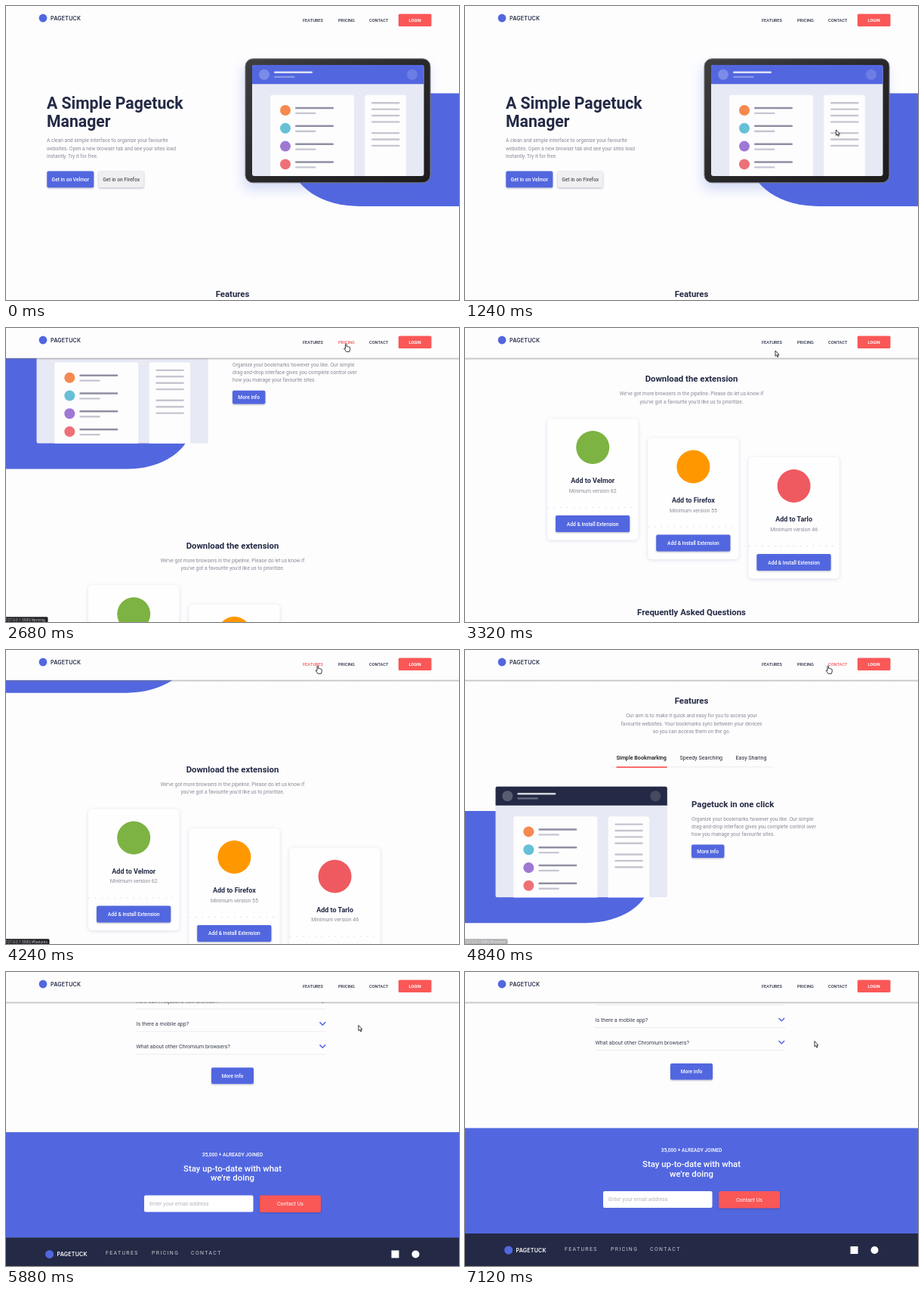
An HTML page that plays this animation: 600x389 px, repeating every 7.16 s.

```html
<!DOCTYPE html>
<html lang="en">
<head>
<meta charset="utf-8">
<title>Pagetuck</title>
<style>
  html, body { margin: 0; width: 100%; height: 100%; overflow: hidden; background: #fdfdfe; }
  svg { display: block; width: 600px; height: 389px; }
  text { font: 400 6.66px Roboto, sans-serif; fill: #8a8b97; }
  .mid { text-anchor: middle; }
  .h1 { font-size: 21.2px; font-weight: 600; fill: #242a45; }
  .h2 { font-size: 11.4px; font-weight: 600; fill: #242a45; }
  .h3 { font-size: 9px; font-weight: 600; fill: #242a45; }
  .tab { font-size: 7.15px; fill: #23252f; }
  .on { font-weight: 500; fill: #111; }
  .btn { font-weight: 500; fill: #fff; text-anchor: middle; }
  .nav { font-size: 5.65px; font-weight: 500; fill: #2b2f45; }
  .brand { font: 600 7.1px Inter, sans-serif; letter-spacing: .2px; fill: #242a45; }
  .foot { font-size: 6.9px; letter-spacing: 1.4px; fill: #c9cad3; }
  .light { fill: #fff; }
  .blue { fill: #5267df; }
  .red { fill: #fa5757; }
  .lift { filter: drop-shadow(0 1.5px 1.2px rgba(40, 45, 90, .35)); }
  .card { fill: #fefefe; filter: drop-shadow(0 1.5px 2.5px rgba(60, 70, 130, .16)); }
  .tablet { filter: drop-shadow(-3px 9px 8px rgba(82, 103, 223, .22)); }
  .rule { stroke: #e4e4ea; stroke-width: .7; }
  .chev { fill: none; stroke: #5267df; stroke-width: 1.5; }
  .dots { stroke: #cfd2e6; stroke-width: 1.3; stroke-linecap: round; stroke-dasharray: 0 8.5; }
</style>
</head>
<body>
<svg viewBox="0 0 600 389" xmlns="http://www.w3.org/2000/svg">
  <defs>
    <linearGradient id="frame" x2="1" y2="1">
      <stop offset="0" stop-color="#3f3f42"/><stop offset=".5" stop-color="#29282a"/><stop offset="1" stop-color="#1d1b1c"/>
    </linearGradient>
    <linearGradient id="fade" x2="0" y2="1">
      <stop offset="0" stop-color="#777" stop-opacity=".55"/><stop offset="1" stop-color="#777" stop-opacity="0"/>
    </linearGradient>
    <clipPath id="screen"><rect x="326" y="78" width="227.5" height="147" rx="3"/></clipPath>
    <g id="lines">
      <rect width="51" height="2.5" rx="1.2" fill="#8f8fa3"/>
      <rect y="7" width="27.5" height="2.3" rx="1.1" fill="#c6c6d2"/>
    </g>
    <!-- app window; its bar takes the current colour -->
    <g id="app" clip-path="url(#screen)">
      <rect x="326" y="78" width="228" height="147" fill="#e7e9f5"/>
      <rect x="326" y="78" width="228" height="25.3" fill="currentColor"/>
      <circle cx="342" cy="90.8" r="7" fill="#fff" opacity=".24"/>
      <circle cx="538" cy="90.8" r="7" fill="#fff" opacity=".15"/>
      <rect x="355" y="86.5" width="51" height="2.6" rx="1.3" fill="#fff" opacity=".8"/>
      <rect x="355" y="92.8" width="27.5" height="2.3" rx="1.1" fill="#fff" opacity=".32"/>
      <rect x="350" y="117.8" width="111" height="120" rx="3" fill="#fdfdfe"/>
      <rect x="475.3" y="117.8" width="54.5" height="120" rx="3" fill="#fdfdfe"/>
      <g id="rows"></g>
    </g>
  </defs>

  <g id="page">
    <!-- hero -->
    <path class="blue" d="M600 115.5H378V205A90 60 0 0 0 468 265H600Z"/>
    <g class="tablet">
      <rect x="317" y="69.8" width="245" height="164" rx="10" fill="url(#frame)" stroke="#77777b" stroke-width="1"/>
    </g>
    <use href="#app" color="#5267df"/>
    <text class="h1" x="54" y="135.6">A Simple Pagetuck</text>
    <text class="h1" x="54" y="160">Manager</text>
    <text x="54" y="180.3">A clean and simple interface to organize your favourite</text>
    <text x="54" y="190.5">websites. Open a new browser tab and see your sites load</text>
    <text x="54" y="200.7">instantly. Try it for free.</text>
    <rect class="blue lift" x="54.3" y="218.5" width="62" height="21.7" rx="2"/>
    <text class="btn" x="85.4" y="231.6">Get in on Velmor</text>
    <rect class="lift" x="122.6" y="218.5" width="60" height="21.7" rx="2" fill="#f0f0f2"/>
    <text class="btn" x="152.6" y="231.6" style="fill:#55565e">Get in on Firefox</text>

    <!-- features -->
    <text class="h2 mid" x="300" y="385.3">Features</text>
    <text class="mid" x="300" y="403.4">Our aim is to make it quick and easy for you to access your</text>
    <text class="mid" x="300" y="413.5">favourite websites. Your bookmarks sync between your devices</text>
    <text class="mid" x="300" y="423.6">so you can access them on the go.</text>
    <text class="tab on" x="200.5" y="458.6">Simple Bookmarking</text>
    <text class="tab" x="284.5" y="458.6">Speedy Searching</text>
    <text class="tab" x="358.5" y="458.6">Easy Sharing</text>
    <path class="rule" d="M192 468.8H408"/>
    <rect class="red" x="200.5" y="468.2" width="67.2" height="1.7"/>
    <path class="blue" d="M0 527H245V618A85 57 0 0 1 160 675.2H0Z"/>
    <use href="#app" color="#242a45" x="-285.7" y="416.4"/>
    <text class="h2" x="300" y="521.5">Pagetuck in one click</text>
    <text x="300" y="539.7">Organize your bookmarks however you like. Our simple</text>
    <text x="300" y="549.9">drag-and-drop interface gives you complete control over</text>
    <text x="300" y="560.1">how you manage your favourite sites.</text>
    <rect class="blue lift" x="300" y="571.5" width="43.4" height="17.6" rx="2"/>
    <text class="btn" x="321.7" y="582.6">More info</text>

    <!-- download -->
    <text class="h2 mid" x="300" y="780.3">Download the extension</text>
    <text class="mid" x="300" y="798.4">We've got more browsers in the pipeline. Please do let us know if</text>
    <text class="mid" x="300" y="808.6">you've got a favourite you'd like us to prioritize.</text>
    <g id="cards"></g>

    <!-- questions -->
    <text class="h2 mid" x="300" y="1089.4">Frequently Asked Questions</text>
    <text class="mid" x="300" y="1107.5">Here are some of our FAQs. If you have any other questions</text>
    <text class="mid" x="300" y="1117.7">you'd like answered please feel free to email us.</text>
    <g id="faq"></g>
    <rect class="blue lift" x="272" y="1271" width="56" height="21.6" rx="2"/>
    <text class="btn" x="300" y="1284.2">More info</text>

    <!-- contact -->
    <rect class="blue" y="1356.5" width="600" height="140"/>
    <text class="btn" x="300" y="1388.4">35,000 + ALREADY JOINED</text>
    <text class="h2 mid light" x="300" y="1408.4" style="font-weight:500">Stay up-to-date with what</text>
    <text class="h2 mid light" x="300" y="1421" style="font-weight:500">we're doing</text>
    <rect class="light" x="183" y="1440" width="144.5" height="22" rx="2"/>
    <text class="tab" x="190" y="1453.4" style="fill:#b4b4bf">Enter your email address</text>
    <rect class="red lift" x="336" y="1440" width="81" height="22.6" rx="2"/>
    <text class="tab mid light" x="376.5" y="1453.6">Contact Us</text>

    <!-- footer -->
    <rect y="1496" width="600" height="44" fill="#242a45"/>
    <circle class="blue" cx="57.6" cy="1518" r="5.5"/>
    <text class="brand light" x="67.5" y="1520.8">PAGETUCK</text>
    <text class="foot" x="132" y="1519">FEATURES</text>
    <text class="foot" x="193" y="1519">PRICING</text>
    <text class="foot" x="245" y="1519">CONTACT</text>
    <rect class="light" x="510.5" y="1513" width="10" height="10"/>
    <circle class="light" cx="542.5" cy="1518" r="5"/>
  </g>

  <!-- fixed bar -->
  <rect width="600" height="40" fill="#fdfdfe"/>
  <rect id="shade" y="39.7" width="600" height="2.8" fill="url(#fade)"/>
  <circle class="blue" cx="49" cy="16" r="5.4"/>
  <text class="brand" x="59" y="18.6">PAGETUCK</text>
  <text class="nav" x="393" y="21">FEATURES</text>
  <text class="nav" x="440" y="21">PRICING</text>
  <text class="nav" x="481" y="21">CONTACT</text>
  <rect class="red" x="519.8" y="10.6" width="43.7" height="16.5" rx="1.6"/>
  <text class="btn" x="541.6" y="21" style="font-size:5.6px;font-weight:700">LOGIN</text>

  <g id="status">
    <path fill="#202124" d="M0 382.3H54a1.5 1.5 0 0 1 1.5 1.5V389H0Z"/>
    <text x="-.5" y="387.8" style="font-size:4.9px;fill:#c4c5c9"></text>
  </g>
  <g id="arrow" fill="#fff" stroke="#222" stroke-width=".9" stroke-linejoin="round">
    <path d="M0 0V7.3L1.7 5.8 2.8 8.4 4 7.9 2.9 5.4H5Z"/>
  </g>
  <g id="hand" fill="#fff" stroke="#222" stroke-width=".9" stroke-linejoin="round">
    <path d="M0 1Q.8-.6 1.6 1V4Q2.6 3.3 3.2 4.3 4.2 3.6 4.8 4.7 6 4.2 6.2 5.6V8.2L5.3 10.8H1.2L-1.8 6.8Q-1.6 5.5 0 6.8Z"/>
  </g>
</svg>
<script>
const $ = id => document.getElementById(id);
const LOOP = 7160;

// repeated parts
$('rows').innerHTML =
  ['#f6894f', '#66c0d6', '#9f78d4', '#ee7077'].map((c, i) => {
    const y = 138 + i * 23.8;
    return `<circle cx="370" cy="${y}" r="7" fill="${c}"/><use href="#lines" x="383" y="${y - 4.2}"/>`;
  }).join('') +
  [0, 1, 2, 3, 4.75, 5.75, 6.75].map(n =>
    `<rect x="484" y="${127 + n * 8.4}" width="37.5" height="2.4" rx="1.2" fill="#c6c6d2"/>`).join('');

$('cards').innerHTML = [
  ['Velmor', 62, '#7cb342'], ['Firefox', 55, '#ff9800'], ['Tarlo', 46, '#ef5a60']
].map(([name, version, color], i) => `
  <g transform="translate(${109 + i * 133.2} ${829 + i * 25.5})">
    <rect class="card" width="120.4" height="160.5" rx="5"/>
    <circle cx="60.2" cy="38" r="22" fill="${color}"/>
    <text class="h3 mid" x="60.2" y="85.4">Add to ${name}</text>
    <text class="mid" x="60.2" y="98" style="font-size:6.95px">Minimum version ${version}</text>
    <path class="dots" d="M1 117.4H120"/>
    <rect class="blue lift" x="11" y="128" width="98.2" height="22" rx="2"/>
    <text class="btn" x="60.2" y="141.5">Add &amp; Install Extension</text>
  </g>`).join('');

$('faq').innerHTML = [
  'What is Pagetuck?', 'How can I request a new browser?',
  'Is there a mobile app?', 'What about other Chromium browsers?'
].map((q, i) => `
  <g transform="translate(172.5 ${1153 + i * 30})">
    <text class="tab" y="2.6" style="fill:#3b4050">${q}</text>
    <path class="chev" d="M243 -2L246.8 1.8 250.6 -2"/>
    <path class="rule" d="M-.5 10.5H251.5"/>
  </g>`).join('');

const clamp = v => Math.min(1, Math.max(0, v));
const ramp = (t, a, d) => clamp((t - a) / d);
const smooth = p => p * p * (3 - 2 * p);

// cubic-bezier(.42, 0, .58, 1), solved by bisection
function easeInOut(x) {
  let lo = 0, hi = 1;
  for (let i = 0; i < 24; i++) {
    const u = (lo + hi) / 2, v = 1 - u;
    if (1.26 * u * v * v + 1.74 * u * u * v + u * u * u < x) lo = u; else hi = u;
  }
  return smooth(lo);
}

// start, duration, distance
const scrolls = [[2259, 688, 709], [4071, 513, -395], [5178, 746, 836]];
const scrollAt = t => scrolls.reduce((y, [a, d, by]) => y + by * easeInOut(ramp(t, a, d)), 0);

// time, x, y
const path = [
  [350, 520, 395], [1000, 505, 210], [1750, 449.5, 20.5], [2950, 449.5, 20.5],
  [3320, 411, 30], [3520, 412, 20.5], [4420, 412, 20.5], [4740, 480, 20.5],
  [5200, 480, 20.5], [5480, 474, 32], [6150, 463, 91.5]
];
function cursorAt(t) {
  let i = 0;
  while (i < path.length - 2 && t > path[i + 1][0]) i++;
  const [a, x, y] = path[i], [b, x2, y2] = path[i + 1];
  const p = smooth(ramp(t, a, b - a));
  return [x + (x2 - x) * p, y + (y2 - y) * p];
}

// link, enter, leave, status width
const visits = [['PRICING', 1650, 2990, 55.5], ['FEATURES', 3450, 4480, 57.5], ['CONTACT', 4680, 5400, 56.5]];
const links = Object.fromEntries([...document.querySelectorAll('.nav')].map(n => [n.textContent, n]));
const [tip, address] = $('status').children;

function draw(t) {
  const y = scrollAt(t);
  $('page').setAttribute('transform', `translate(0 ${-y})`);
  $('shade').setAttribute('opacity', clamp(y / 80));

  let over = false, shown = 0;
  for (const [name, a, b, w] of visits) {
    const red = ramp(t, a, 150) * (1 - ramp(t, b + 100, 200));
    links[name].style.fill = `color-mix(in srgb, #fa5757 ${red * 100}%, #2b2f45)`;
    if (t > a && t < b) over = true;
    const o = ramp(t, a + 120, 120) * (1 - ramp(t, b + 100, 120));
    if (o > shown) {
      shown = o;
      address.textContent = '127.0.0.1:5500/#' + name.toLowerCase();
      tip.setAttribute('d', `M0 382.3H${w - 1.5}a1.5 1.5 0 0 1 1.5 1.5V389H0Z`);
    }
  }
  $('status').setAttribute('opacity', shown);

  const [cx, cy] = cursorAt(t);
  for (const id of ['arrow', 'hand']) {
    $(id).setAttribute('transform', `translate(${cx} ${cy})`);
    $(id).style.display = over === (id === 'hand') ? '' : 'none';
  }
}

const start = performance.now();
function tick(now) {
  draw(Math.max(0, now - start) % LOOP);
  requestAnimationFrame(tick);
}
draw(0);
requestAnimationFrame(tick);
</script>
</body>
</html>
```
